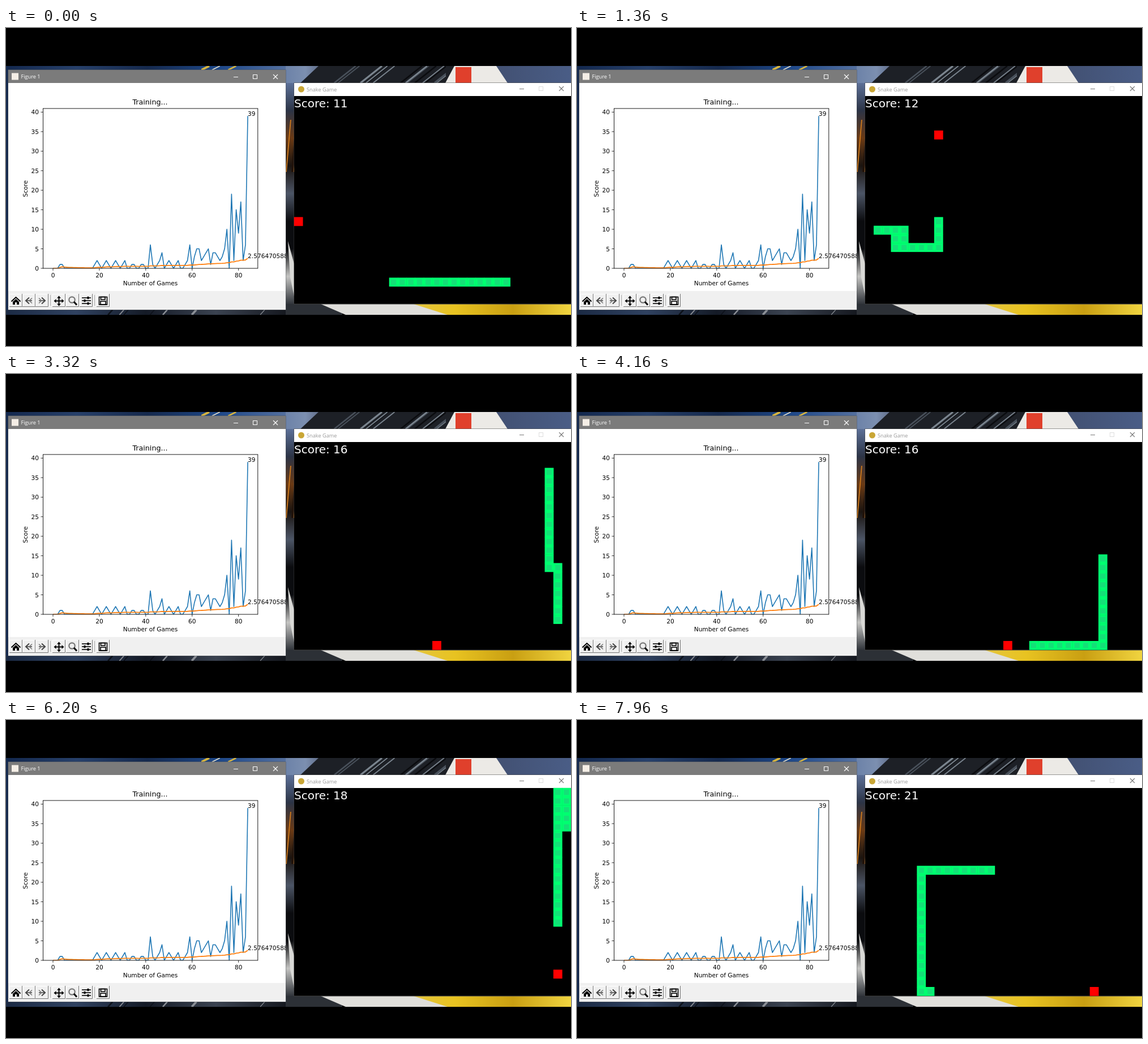
These frames come from a looping animation (998x561 px, 8000 ms). An HTML page with a canvas:

```html
<!DOCTYPE html>
<html lang="en">
<head>
<meta charset="utf-8">
<title>Snake training</title>
<style>
  html, body { margin: 0; width: 100%; height: 100%; overflow: hidden; background: #000; }
  canvas { display: block; width: 998px; height: 561px; }
</style>
</head>
<body>
<canvas id="stage" width="998" height="561"></canvas>
<script>
const W = 998, H = 561, LOOP = 8000, FRAME = 40;
const PLOT_FONT = '"DejaVu Sans", sans-serif';
const UI_FONT = '"Open Sans", sans-serif';
const stage = document.getElementById('stage').getContext('2d');
const backdrop = document.createElement('canvas');
backdrop.width = W;
backdrop.height = H;
const g = backdrop.getContext('2d');

function rect(color, x, y, w, h) {
  g.fillStyle = color;
  g.fillRect(x, y, w, h);
}

function box(color, width, x, y, w, h) {
  g.strokeStyle = color;
  g.lineWidth = width;
  g.strokeRect(x, y, w, h);
}

function poly(color, ...p) {
  g.fillStyle = color;
  g.beginPath();
  for (let i = 0; i < p.length; i += 2) g.lineTo(p[i], p[i + 1]);
  g.fill();
}

function line(color, width, ...p) {
  g.strokeStyle = color;
  g.lineWidth = width;
  g.beginPath();
  for (let i = 0; i < p.length; i += 2) g.lineTo(p[i], p[i + 1]);
  g.stroke();
}

function text(str, x, y, size, color = '#000', align = 'left', font = PLOT_FONT) {
  g.font = `${size}px ${font}`;
  g.fillStyle = color;
  g.textAlign = align;
  g.fillText(str, x, y);
}

function clipped(x, y, w, h, paint) {
  g.save();
  g.beginPath();
  g.rect(x, y, w, h);
  g.clip();
  paint();
  g.restore();
}

// Soft gradient in a box, along its longer side
function ramp(x, y, w, h, ...colors) {
  const grad = w > h ? g.createLinearGradient(x, 0, x + w, 0) : g.createLinearGradient(0, y, 0, y + h);
  colors.forEach((c, i) => grad.addColorStop(i / (colors.length - 1), c));
  rect(grad, x, y, w, h);
}

let seed = 7;
function random() {
  seed = seed * 16807 % 2147483647;
  return seed / 2147483647;
}

// Parallel slanted strokes at seeded places
function streaks(n, colors, x, y, w, h, slant) {
  clipped(x, y, w, h, () => {
    for (let i = 0; i < n; i++) {
      const sx = x + random() * w;
      line(colors[i % colors.length], 1 + random() * 3, sx, y + h, sx + slant, y);
    }
  });
}

// Wallpaper: only narrow strips show around the windows
function drawPhoto() {
  rect('#000', 0, 0, W, H);
  ramp(0, 67, 500, 439, '#13284e', '#27406a', '#15294d', '#1d4788', '#56719f');
  streaks(3, ['#d9b640', '#e8e2cc'], 345, 67, 65, 7, 14);

  // helmet along the top
  ramp(494, 67, 70, 30, '#6c82a8', '#7c8fb0', '#56617a');
  poly('#1d2026', 520, 97, 552, 67, 810, 67, 780, 97);
  streaks(16, ['#7b858f', '#0b0c0f', '#49515b'], 552, 67, 225, 30, 38);
  ramp(850, 67, 148, 30, '#414f70', '#4a5d86');
  poly('#eceae6', 776, 97, 792, 67, 866, 67, 886, 97);
  rect('#e0402c', 794, 69, 28, 28);

  // gap between the windows
  ramp(494, 97, 16, 390, '#5c7098', '#2c3446', '#6b3a14', '#1a1410', '#4c5566', '#0b0c0f', '#0b0c0f', '#c4c4c2', '#30343a');
  streaks(3, ['#d07a1c', '#22130a'], 494, 162, 16, 92, 8);
  poly('#d9d9d6', 498, 376, 510, 420, 510, 478, 502, 440);

  // bottom strip
  ramp(0, 497, 494, 9, '#1b2a44', '#2f4160', '#141a26', '#3a4250', '#15181f');
  streaks(8, ['#8b8f96', '#0d1119'], 0, 497, 494, 9, 8);
  rect('#2c3036', 494, 487, 100, 19);
  ramp(690, 487, 308, 19, '#e3c64a', '#e8c321', '#c99f12', '#f0d440');
  poly('#e0dfdb', 556, 487, 720, 487, 780, 506, 600, 506);
}

function windowButtons(x, y, color, maxColor = color) {
  line(color, 1, x - 4, y + .5, x + 4, y + .5);
  box(maxColor, 1, x + 30.5, y - 3.5, 7, 7);
  line(color, 1.1, x + 66, y - 4, x + 74, y + 4);
  line(color, 1.1, x + 66, y + 4, x + 74, y - 4);
}

// Early games ripple between 0 and 2, with a few lucky ones; then the agent improves
const lucky = { 3: 1, 4: 1, 42: 6, 47: 4 };
const late = [6, 0, 3, 5, 5, 2, 3, 4, 5, 1, 4, 4, 3, 2, 3, 5, 10, 0, 19, 2, 15, 9, 17, 2, 6, 39];
const ripple = i => i < 17 ? 0 : Math.round(.8 + .856 * Math.cos((i - 23) / 3.85 * 2 * Math.PI));
const scores = Array.from({ length: 59 }, (_, i) => lucky[i] ?? ripple(i)).concat(late);
let total = 0;
const means = scores.map((s, i) => (total += s) / (i + 1));
const px = n => 83 + n * 4.096;
const py = s => 424 - s * 6.89;

function drawSeries(values, color, width) {
  line(color, width, ...values.flatMap((v, i) => [px(i), py(v)]));
}

function drawPlot() {
  const size = 10.6;
  text('Training...', 254.5, 135, 12.7, '#000', 'center');
  text('Number of Games', 255, 454, size, '#000', 'center');
  g.save();
  g.translate(38, 283.5);
  g.rotate(-Math.PI / 2);
  text('Score', 0, 0, size, '#000', 'center');
  g.restore();

  for (let n = 0; n <= 80; n += 20) {
    line('#000', .8, px(n), 424, px(n), 428);
    text(n, px(n), 440, size, '#000', 'center');
  }
  for (let s = 0; s <= 40; s += 5) {
    line('#000', .8, 61.5, py(s), 65.5, py(s));
    text(s, 58, py(s) + 4, size, '#000', 'right');
  }

  clipped(65.5, 142, 379.5, 282, () => {
    g.lineJoin = 'round';
    drawSeries(scores, '#1f77b4', 1.6);
    drawSeries(means, '#ff7f0e', 1.8);
  });
  box('#000', .9, 65.5, 142, 379.3, 282);

  const last = scores.length - 1;
  text(scores[last], px(last), py(scores[last]), size);
  text(means[last], px(last), py(means[last]), size);
}

function arrow(x, dir) {
  line('#666', 2, x - 5 * dir, 481, x + 5 * dir, 481);
  line('#444', 2, x, 475.5, x + 6 * dir, 481, x, 486.5);
  line('#777', 1.5, x - 5 * dir, 476.5, x, 481, x - 5 * dir, 485.5);
}

function drawToolbar() {
  rect('#f0f0f0', 4, 464, 490, 33);
  for (const x of [6, 29, 52, 82, 106, 130, 160]) {
    line('#fff', 1, x + .5, 491, x + .5, 469.5, x + 22, 469.5);
    line('#777', 1, x + 22.5, 469, x + 22.5, 491.5, x, 491.5);
  }
  for (const x of [78.5, 156.5]) line('#aaa', 1, x, 471, x, 490);

  // home
  line('#000', 2, 9.5, 482.5, 17.5, 475, 25.5, 482.5);
  poly('#000', 12, 483, 17.5, 478, 23, 483, 23, 488, 12, 488);
  rect('#f0f0f0', 16, 484, 3, 4);
  arrow(41, -1);
  arrow(63, 1);

  // pan
  for (let k = 0; k < 4; k++) {
    g.save();
    g.translate(93.5, 481.5);
    g.rotate(k * Math.PI / 2);
    line('#000', 2, 0, 0, 0, -6);
    poly('#000', 0, -9, 3.5, -5, -3.5, -5);
    g.restore();
  }

  // zoom
  g.beginPath();
  g.arc(116.5, 479.5, 5.2, 0, 7);
  g.lineWidth = 2.2;
  g.stroke();
  line('#000', 3, 120, 483, 125, 488.5);

  // sliders
  for (let k = 0; k < 3; k++) {
    const y = 476 + 5 * k;
    line('#000', 1.6, 134, y, 150, y);
    rect('#000', k === 1 ? 137.5 : 143.5, y - 2.2, 3, 4.4);
  }

  // save
  box('#000', 1.6, 164.5, 474.5, 14, 13.5);
  box('#000', 1.6, 167.5, 474.5, 7.5, 4.5);
  box('#000', 1.6, 167, 482, 9, 6);
}

function drawFigureWindow() {
  rect('#55585c', 3.5, 73.5, 491, 424);
  rect('#7b7b7b', 4, 74, 490, 23);
  rect('#f5eee6', 10, 79.5, 12, 12);
  text('Figure 1', 26.5, 89.3, 9.2, '#fff', 'left', UI_FONT);
  windowButtons(406, 86, '#fff');
  rect('#fff', 4, 97, 490, 367);
  clipped(4, 97, 490, 400, () => {
    drawPlot();
    drawToolbar();
  });
}

const CELL = 15.27, LEFT = 509, TOP = 120;

function drawGameWindow() {
  rect('#444', 508.5, 96.5, 490, 391);
  rect('#fff', 509, 97, 489, 23);
  g.fillStyle = '#c9a635';
  g.beginPath();
  g.arc(521.5, 108, 5.5, 0, 7);
  g.fill();
  text('Snake Game', 531, 111.5, 9.2, '#999', 'left', UI_FONT);
  windowButtons(911, 107, '#777', '#ddd');
  rect('#000', LEFT, TOP, 489, 366.5);
}

// Moves of the snake up to each time; * marks food at the end of a move
const legs = [
  { end: 1360, path: 'R7 U7 L31* D1 R4 D1 L1 D1 R5 U3' },
  { end: 2240, path: 'U10* U3 L3* D8 R12* R3' },
  { end: 3320, path: 'R6 D3 R5 U12 L2 D14 R1* D6' },
  { end: 5000, path: 'R1 U11 L4 D14 L11* L2 U6 L14 U1 R13' },
  { end: 6200, path: 'R1* R17 U16 L1 D15' },
  { end: 7960, path: 'D6* D2 L18* U3 R9 U11 L5* L10 D14 R1' },
  { end: 8400, path: 'R19*' }
];
const DIRS = { R: [1, 0], L: [-1, 0], U: [0, -1], D: [0, 1] };
const START_SCORE = 11, START_LEN = 14;

const trail = Array.from({ length: START_LEN }, (_, i) => [11 + i, 21]);
const foods = [], eaten = [0];
let clock = 0;
for (const leg of legs) {
  leg.start = clock;
  leg.first = eaten.length - 1;
  for (const [, dir, count, food] of leg.path.matchAll(/(\w)(\d+)(\*?)/g)) {
    const [dx, dy] = DIRS[dir];
    for (let k = 0; k < count; k++) {
      const [x, y] = trail.at(-1);
      trail.push([x + dx, y + dy]);
      eaten.push(foods.length);
    }
    if (food) eaten[eaten.length - 1] = foods.push(trail.at(-1));
  }
  leg.steps = eaten.length - 1 - leg.first;
  clock = leg.end;
}

function stepAt(t) {
  const leg = legs.find(l => t < l.end);
  return leg.first + Math.floor((t - leg.start) / (leg.end - leg.start) * leg.steps + 1e-6);
}

// Cells grow by a hair so that neighbours join without seams
function cell(color, [c, r], inset = -.25) {
  const size = CELL - 2 * inset;
  stage.fillStyle = color;
  stage.fillRect(LEFT + c * CELL + inset, TOP + r * CELL + inset, size, size);
}

function draw(t) {
  const step = stepAt(t), n = eaten[step];
  const body = trail.slice(step - n, START_LEN + step);
  stage.drawImage(backdrop, 0, 0);
  for (const c of body) cell('#00ff70', c);
  for (const c of body) cell('#14e078', c, CELL / 5);
  cell('#ff0000', foods[n]);
  stage.font = `20px ${PLOT_FONT}`;
  stage.fillStyle = '#fff';
  stage.fillText('Score: ' + (START_SCORE + n), 509, 139.7);
}

drawPhoto();
drawFigureWindow();
drawGameWindow();

const began = performance.now();
function tick() {
  const t = (performance.now() - began) % LOOP;
  draw(Math.floor(t / FRAME) * FRAME);
  requestAnimationFrame(tick);
}
draw(0);
requestAnimationFrame(tick);
</script>
</body>
</html>
```
